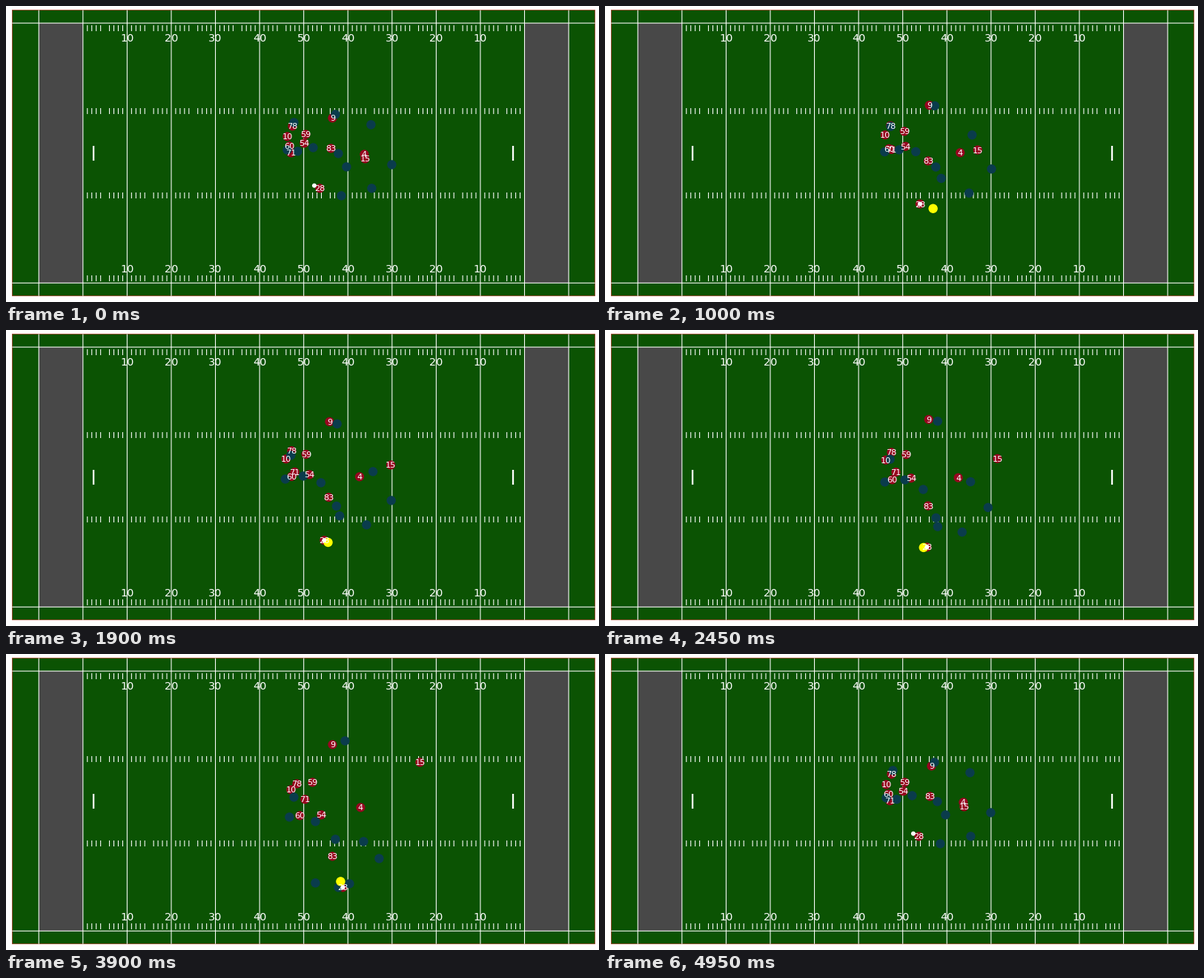
A matplotlib script for the animation above (5000 ms loop, 800 by 400 pixels).

```python
import numpy as np
import matplotlib.pyplot as plt
from matplotlib.animation import FuncAnimation
from matplotlib.patches import Circle, Rectangle

W, H, DPI = 800, 400, 100
PX = 72 / DPI
FRAMES, INTERVAL = 100, 50
GREEN, GRAY, EDGE = "#0b5303", "#484848", "#b3200f"
RED, BLUE, YELLOW = "#97051f", "#0a3c4c", "#ffff00"
LEFT, RIGHT, TOP, BOTTOM = 8.3, 794.6, 5.5, 391.8

# Ways of running: how far a path bows away from the straight line
HOLD, SWING, CLOSE = (8, 11), (8, 27), (-15, 28)
SPRINT, CUT = (2, -10), (18, -9)

# Jersey, start, point reached at the tackle, way of running
OFFENSE = [
    ("9", (440, 151), (440, 122), SWING),
    ("78", (386, 162), (392, 175), HOLD),
    ("59", (404, 173), (413, 173), HOLD),
    ("10", (379, 176), (384, 183), HOLD),
    ("54", (402, 185), (425, 217), HOLD),
    ("60", (382, 189), (396, 218), HOLD),
    ("71", (384, 198), (403, 196), HOLD),
    ("83", (438, 192), (440, 273), HOLD),
    ("4", (483, 200), (478, 207), HOLD),
    ("15", (484, 206), (558, 146), SPRINT),
    ("28", (423, 246), (454, 315), CUT),
]
DEFENSE = [
    ("", (388, 157), (388, 193), HOLD),
    ("", (379, 194), (382, 220), HOLD),
    ("", (393, 196), (417, 226), SWING),
    ("", (414, 191), (444, 250), SWING),
    ("", (444, 146), (457, 117), HOLD),
    ("", (492, 160), (482, 253), CLOSE),
    ("", (520, 214), (503, 276), CLOSE),
    ("", (493, 246), (463, 310), CLOSE),
    ("", (452, 256), (417, 309), SPRINT),
    ("", (459, 217), (448, 315), SWING),
    ("", (448, 199), (451, 307), SWING),
]
# Slots at which the next tackler is picked out
SWITCH = [10, 57, 70]
TACKLERS = [None, 8, 9, 10]


def progress(i):
    """Three data steps per four slots, slowing down after the tackle."""
    u = (i * 3 // 4) / 58
    late = max(0, u - 1)
    return u - 1.7 * late**2


def run(player, u):
    _, start, end, bow = player
    start, end, bow = np.array([start, end, bow], float)
    return start + (end - start) * u - bow / 2 * np.sin(np.pi * u) + 0.4


fig = plt.figure(figsize=(W / DPI, H / DPI), dpi=DPI, facecolor="white")
ax = fig.add_axes([0, 0, 1, 1])
ax.set(xlim=(0, W), ylim=(H, 0))
ax.axis("off")


def yard(n):
    return 44.25 + 5.957 * n


def box(x0, y0, x1, y1, color, **kw):
    ax.add_patch(Rectangle((x0, y0), x1 - x0, y1 - y0, fc=color,
                           snap=False, **kw))


def vlines(xs, y0, y1, width=1.07):
    ax.vlines(xs, y0, y1, colors="white", lw=width * PX, snap=False, zorder=2)


def label(x, y, s, size, z):
    # Centred on the digits, whose height is about 0.7 em
    return ax.text(x, y + 0.35 * size, s, color="white", fontsize=size * PX,
                   ha="center", va="baseline", zorder=z)


def dot(radius, color, z):
    return ax.add_patch(Circle((0, 0), radius, fc=color, lw=0, zorder=z))


box(LEFT, TOP, RIGHT, BOTTOM, GREEN, ec=EDGE, lw=0.6 * PX)
for n in (0, 110):
    box(yard(n), 23.1, yard(n + 10), 374.3, GRAY, lw=0)
vlines([yard(n) for n in range(0, 121, 10)], TOP, BOTTOM)
ax.hlines([23.1, 374.3], LEFT, RIGHT, colors="white", lw=1.07 * PX,
          snap=False, zorder=2)
ticks = [yard(n) for n in range(11, 110) if n % 5]
for top in (26, 138, 252, 364):
    vlines(ticks, top, top + 8)
vlines([yard(12.4), yard(107.4)], 189, 209, width=2.3)
for n in range(20, 101, 10):
    for y in (43.4, 355.4):
        label(yard(n), y, str(min(n - 10, 110 - n)), 14.4, 3)

red_dots = [dot(6.1, RED, 4) for _ in OFFENSE]
blue_dots = [dot(6.2, BLUE, 5) for _ in DEFENSE]
jerseys = [label(0, 0, p[0], 11.3, 7) for p in OFFENSE]
ball = dot(3, "white", 8)


def draw(i):
    i %= FRAMES - 1  # the last slot shows the start again
    u = progress(i)
    for player, mark, text in zip(OFFENSE, red_dots, jerseys):
        x, y = run(player, u)
        mark.center = x, y
        text.set_position((x, y + 4))
    tackler = TACKLERS[np.searchsorted(SWITCH, i, side="right")]
    for k, (player, mark) in enumerate(zip(DEFENSE, blue_dots)):
        mark.center = run(player, u)
        hot = k == tackler
        mark.set(facecolor=YELLOW if hot else BLUE, zorder=6 if hot else 5)
    # The pitch reaches the carrier, who is listed last
    ball.center = run(OFFENSE[-1], u) - np.array([7.5, 3.7]) * max(0, 1 - 5 * u)
    return [*red_dots, *blue_dots, *jerseys, ball]


anim = FuncAnimation(fig, draw, frames=FRAMES, interval=INTERVAL,
                     init_func=lambda: draw(0), repeat=True, repeat_delay=0)
plt.show()
```
